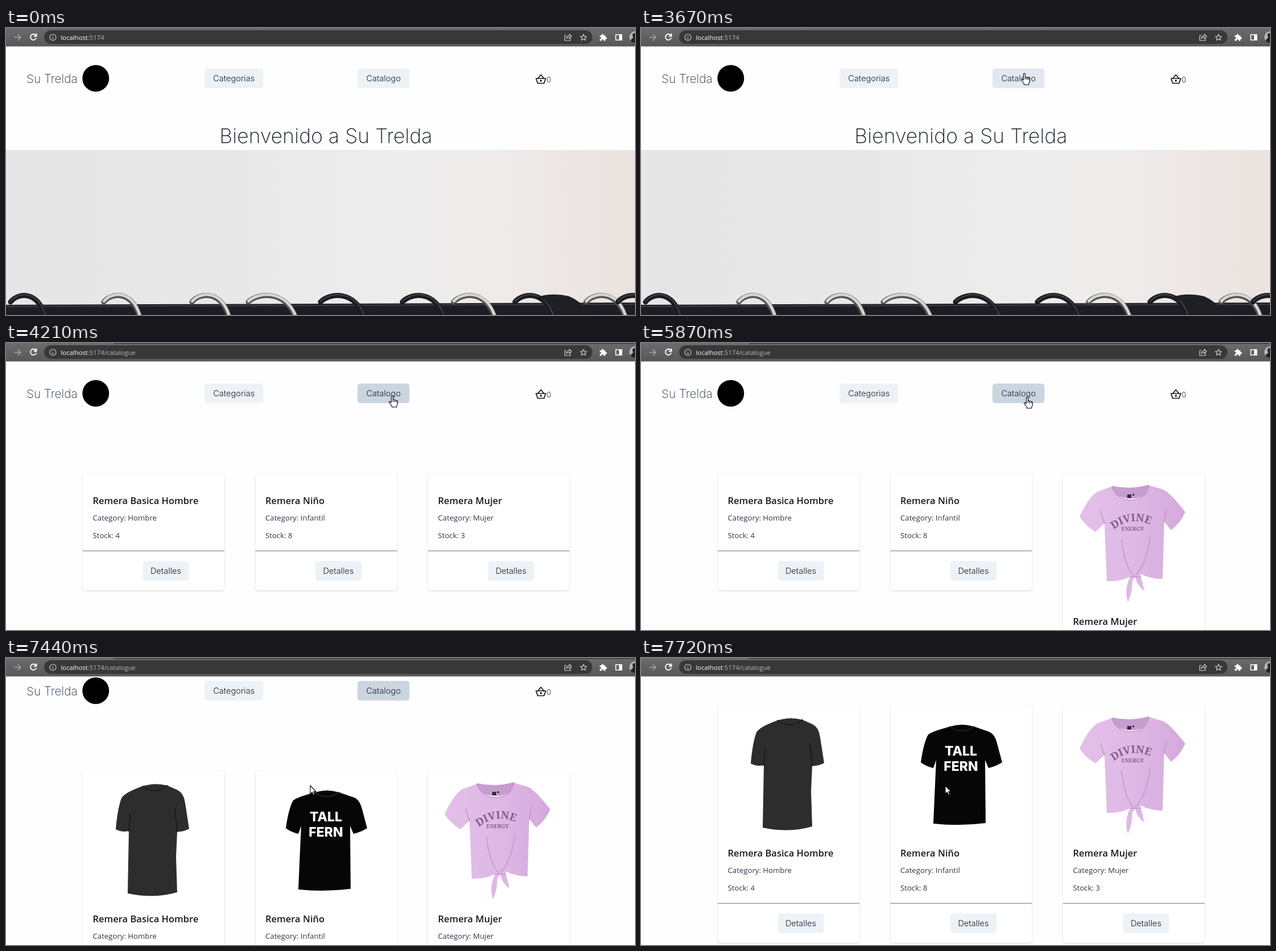
An HTML page that plays this animation: 1106x506 px, repeating every 8000 ms.

```html
<!DOCTYPE html>
<html lang="es">
<head>
<meta charset="utf-8">
<title>Su Trelda</title>
<style>
  html, body { margin: 0; width: 100%; height: 100%; overflow: hidden; background: #fefefe; }
  svg { display: block; width: 1106px; height: 506px; }
  .ui { font-family: Inter, sans-serif; fill: #1a202c; }
  .sans { font-family: "Open Sans", sans-serif; fill: #2d3748; font-size: 13.2px; }
  .name { font-weight: 600; font-size: 16.5px; fill: #171923; }
  .card { fill: #fff; filter: drop-shadow(0 1px 1.5px rgba(0, 0, 0, .16)); }
  .line { fill: none; stroke-linecap: round; stroke-linejoin: round; }
</style>
</head>
<body>
<svg viewBox="0 0 1106 506">
  <defs>
    <linearGradient id="chrome" x2="0" y2="1">
      <stop stop-color="#6c6c6c"/><stop offset="1" stop-color="#575757"/>
    </linearGradient>
    <linearGradient id="wall">
      <stop stop-color="#e6e6e7"/><stop offset=".35" stop-color="#e8e8e8"/>
      <stop offset=".62" stop-color="#ededed"/><stop offset=".78" stop-color="#eeebea"/>
      <stop offset="1" stop-color="#ebe3e0"/>
    </linearGradient>
    <linearGradient id="pink">
      <stop stop-color="#e3bfe9"/><stop offset=".5" stop-color="#dfb9e6"/><stop offset="1" stop-color="#d3a9db"/>
    </linearGradient>
    <path id="arc" d="M831 182Q866 154 907 179"/>
  </defs>

  <g id="page">
    <g id="header" class="ui">
      <text x="36" y="97" font-size="20.8" font-weight="250" style="fill:#1f3347">Su Trelda</text>
      <circle cx="157.800" cy="88.700" r="23.500" fill="#000"/>
      <g class="line" stroke="#111" stroke-width="1.7">
        <path d="M932 89H949L946 97.500H935ZM935.500 88.500L940.500 82.500L945.500 88.500"/>
        <circle cx="940.500" cy="93" r=".9"/>
      </g>
      <text x="950.5" y="95.500" font-size="13" font-weight="300">0</text>
    </g>
    <g id="home">
      <text class="ui" x="562.5" y="203" font-size="35.6" font-weight="200" text-anchor="middle">Bienvenido a Su Trelda</text>
      <rect y="215" width="1106" height="291" fill="url(#wall)"/>
      <path d="M0 488L1106 484V506H0Z" fill="#1d1e25"/>
      <path class="line" d="M0 491L1106 487" stroke="#3b3c44" stroke-width="2"/>
      <g id="rings" class="line"></g>
      <path d="M935 474Q960 466 990 473Q1012 482 1028 506H972Q962 486 935 474Z" fill="#1f2026"/>
    </g>
    <g id="catalogue"></g>
  </g>

  <g id="browser">
    <rect width="1106" height="32.500" fill="url(#chrome)"/>
    <rect id="tabEdge" x="190" width="916" height="1.5" fill="#3a3a3a"/>
    <rect x="67" y="4" width="964" height="24" rx="12" fill="#383838"/>
    <g class="line" stroke="#a9a9a9" stroke-width="1.5">
      <path d="M15 16.500H26M21 11.500L26 16.500L21 21.500"/>
      <path d="M52.500 13A5.200 5.200 0 1 0 53 18M53.500 10.500V14.500H49.500" stroke="#fff" stroke-width="1.9"/>
      <g stroke="#d0d0d0" stroke-width="1.2">
        <circle cx="82.500" cy="16.500" r="5.500"/><path d="M82.500 16V19.500M82.500 13.500V13.600"/>
        <path d="M985 13H982.500V22H992.500V19M985.500 18.500Q986.500 13.500 990.500 13.500V11L994.500 14.800L990.500 18.500V16Q987.500 16 985.500 18.500Z"/>
        <path d="M1015.500 11L1017.100 14.700L1021 15L1018 17.600L1019 21.500L1015.500 19.400L1012 21.500L1013 17.600L1010 15L1013.900 14.700Z"/>
      </g>
    </g>
    <path d="M1044 13H1047.200A1.900 1.900 0 1 1 1050.800 13H1054V16A1.900 1.900 0 1 1 1054 19.500V22.500H1050.500A1.700 1.700 0 1 0 1047.500 22.500H1044V19A1.700 1.700 0 1 0 1044 16Z" fill="#fff"/>
    <path d="M1071.500 11H1083.500V22H1071.500ZM1073 12.500V20.500H1078V12.500Z" fill="#fff" fill-rule="evenodd"/>
    <circle cx="1106" cy="16" r="10" fill="#b9b4b0"/>
    <path d="M1098 22Q1101 18 1103 17Q1099 9 1106 9V26Q1101 26 1098 22Z" fill="#25211f"/>
    <text class="sans" x="96.500" y="20.500" style="font-size:11.3px;fill:#fff">localhost<tspan fill="#b4b7bb">:5174<tspan id="route">/catalogue</tspan></tspan></text>
  </g>

  <g id="cursor" class="line" stroke="#000" stroke-width="1.1" style="fill:#fff">
    <path id="arrow" d="M0 0V14.500L3.300 11.500L5.600 16.600L7.900 15.600L5.700 10.600H10.200Z"/>
    <path id="hand" d="M-1.500 1.200Q0 -1 1.500 1.200V7.200Q3.500 6 4.500 7.800Q6.200 6.900 7.200 8.700Q9.500 8 9.500 10.500V14Q9.500 16 7.800 18V20H-.500V18Q-2.500 15.500 -5 12Q-5.800 9.800 -3.600 10.200L-1.500 12ZM1.500 7.200V10.500M4.500 8V10.800M7.200 9V11.300"/>
  </g>
</svg>

<script>
const LOOP = 8000, PRESS = 3880, NAVIGATE = 4020, HOVER = 1190;
const $ = id => document.getElementById(id);
const add = (id, markup) => $(id).insertAdjacentHTML('beforeend', markup);
const show = (el, on) => { el.style.display = on ? '' : 'none'; };
const move = (el, x, y) => el.setAttribute('transform', `translate(${x} ${y})`);

const button = (x, y, w, label, id = '') => `
  <rect id="${id}" x="${x}" y="${y}" width="${w}" height="34.5" rx="5" fill="#edf2f7"/>
  <text class="ui" x="${x + w / 2}" y="${y + 22}" font-size="14.6" font-weight="350" text-anchor="middle">${label}</text>`;

add('header', button(349, 71.5, 103.5, 'Categorias') + button(618, 71.5, 91.5, 'Catalogo', 'catalogButton'));

// Hanger rings: left edge, width, edge and shine colours
const dark = ['#1b1c22', '#44454d'], steel = ['#55534f', '#d6d5d1'];
const rings = [[8, 62, dark], [172, 64, steel], [327, 66, steel], [426, 84, steel], [553, 78, dark],
  [697, 74, dark], [787, 73, steel], [895, 68, dark], [1020, 70, steel], [1076, 68, dark]];
for (const [x, w, [edge, shine]] of rings) {
  const curve = `M${x} 483C${x + w * .2} 467 ${x + w * .78} 461 ${x + w} 512`;
  add('rings', `<path d="${curve}" stroke="${edge}" stroke-width="9"/>
    <path d="${curve}" transform="translate(.5 -1.5)" stroke="${shine}" stroke-width="${edge === dark[0] ? 2 : 5}"/>`);
}

const blackTee = `
  <path d="M240 110Q262 103 284 109L302 117Q313 123 315 140L322 185Q312 191 301 190L299 235L301 297Q260 309 214 299L216 189Q204 192 193 186Q196 150 203 131Q209 121 240 110Z" fill="#2d2d2d"/>
  <path class="line" d="M240 110Q262 126 284 109M216 189L219 160M301 190L297 150" stroke="#1b1b1b" stroke-width="2"/>`;
const printTee = `
  <path d="M543 121Q564 114 586 121L612 130Q622 134 626 150L635 184Q624 191 611 194L605 180L606 291Q560 297 514 292L519 180L514 194Q501 191 492 184Q497 149 505 135Q510 130 543 121Z" fill="#060606"/>
  <path class="line" d="M543 121Q564 136 586 121" stroke="#222" stroke-width="2"/>
  <g class="ui" font-size="23" font-weight="800" text-anchor="middle" style="fill:#fff">
    <text x="562.5" y="172">TALL</text><text x="562.5" y="199">FERN</text>
  </g>`;
const pinkTee = `
  <path d="M829 105Q862 112 892 103L897 114Q865 140 827 116Z" fill="#c79dcf"/>
  <path d="M828 106Q836 130 863 130Q889 128 893 104L917 111Q929 115 957 151Q949 170 932 183L920 168L917 269Q897 269 878 260L885 290Q873 282 869 266L864 272Q864 294 856 310Q849 288 860 265Q842 274 819 273L815 171L799 186Q781 175 771 159Q789 122 803 115Z" fill="url(#pink)"/>
  <path class="line" d="M828 106Q836 130 863 130Q889 128 893 104M845 200Q850 245 866 263M895 195Q890 240 870 262M815 171L808 150M920 168L924 145M860 265H878" stroke="#c397cc" stroke-width="1.6"/>
  <path d="M855 120H862V126H855ZM864 119H867V122H864Z" fill="#33283a"/>
  <g font-family="Noto Serif, serif" font-weight="700" fill="#805d88">
    <text font-size="18.5"><textPath href="#arc">DIVINE</textPath></text>
    <text x="864.5" y="184" font-size="9.3" text-anchor="middle">ENERGY</text>
  </g>`;

const products = [
  { x: 135, name: 'Remera Basica Hombre', category: 'Hombre', stock: 4, art: blackTee, loaded: 5940 },
  { x: 438.5, name: 'Remera Niño', category: 'Infantil', stock: 8, art: printTee, loaded: 5940 },
  { x: 742, name: 'Remera Mujer', category: 'Mujer', stock: 3, art: pinkTee, loaded: 5870 }
];
products.forEach(({ x, name, category, stock, art }, i) => add('catalogue', `
  <rect id="card${i}" class="card" x="${x}" y="229" width="249" rx="5"/>
  <g id="art${i}" transform="translate(0 147)">${art}</g>
  <g id="info${i}">
    <text class="sans name" x="${x + 17.5}" y="284">${name}</text>
    <text class="sans" x="${x + 17.5}" y="313">Category: ${category}</text>
    <text class="sans" x="${x + 17.5}" y="344">Stock: ${stock}</text>
    <rect x="${x}" y="366" width="249" height="1" fill="#777"/>
    ${button(x + 105.5, 384.5, 81, 'Detalles')}
  </g>`));

// Pointer stops: time, x, y
const stops = [[500, 1064, 464], [1260, 679, 89], [1400, 677, 80], [3600, 677, 80], [3670, 674, 80],
  [4150, 679, 93], [4690, 679, 93], [4740, 679, 95], [6200, 679, 95], [6450, 698, 72],
  [7030, 816, 254], [7330, 535, 225], [LOOP, 535, 225]];
const clamp = p => Math.min(1, Math.max(0, p));
const smooth = p => (1 - Math.cos(Math.PI * clamp(p))) / 2;

function pointerAt(t) {
  const i = Math.max(1, stops.findIndex(s => s[0] > t));
  const [t0, x0, y0] = stops[i - 1], [t1, x1, y1] = stops[i];
  const p = smooth((t - t0) / (t1 - t0));
  return [x0 + (x1 - x0) * p, y0 + (y1 - y0) * p];
}

function draw(now) {
  const t = now % LOOP, onCatalogue = t >= NAVIGATE;
  move($('page'), 0, -Math.round(147 * smooth((t - 7320) / 400)));
  show($('home'), !onCatalogue);
  for (const id of ['catalogue', 'route', 'tabEdge']) show($(id), onCatalogue);
  $('catalogButton').setAttribute('fill', t < HOVER ? '#edf2f7' : t < PRESS ? '#e2e8f0' : '#cbd5e0');

  products.forEach(({ loaded }, i) => {
    const open = t >= loaded;
    show($('art' + i), open);
    $('card' + i).setAttribute('height', open ? 420 : 207);
    move($('info' + i), 0, open ? 213 : 0);
  });

  const [x, y] = pointerAt(t), overButton = x > 618 && x < 709 && y > 72 && y < 106;
  show($('cursor'), t >= 500);
  move($('cursor'), x, y);
  show($('hand'), overButton);
  show($('arrow'), !overButton);
}

const start = performance.now();
function tick() {
  draw(performance.now() - start);
  requestAnimationFrame(tick);
}
tick();
</script>
</body>
</html>
```
